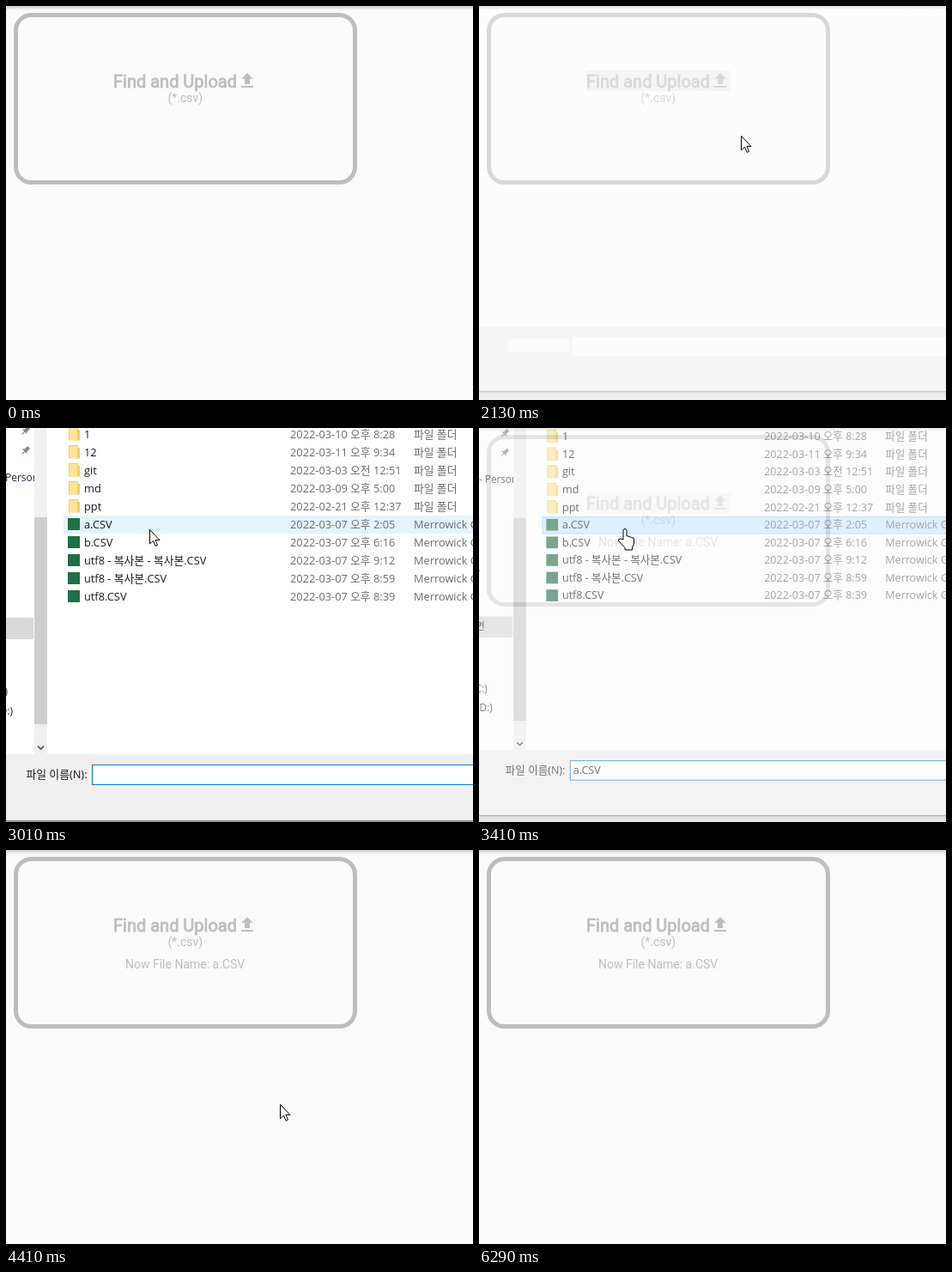
Animation of 544 by 459 pixels, one loop 6670 ms. Source, as an HTML page:

```html
<!DOCTYPE html>
<html lang="ko">
<head>
<meta charset="utf-8">
<title>CSV upload</title>
<style>
  html, body { margin: 0; width: 100%; height: 100%; overflow: hidden; background: #fafafa; }
  svg { display: block; }
  #page { font: 14px Roboto, sans-serif; fill: #bdbdbd; }
  #title { font-size: 20px; stroke: #bdbdbd; stroke-width: .8; }
  #dialog { font: 12.8px "Open Sans", "Noto Sans CJK KR", "Noto Sans CJK JP", sans-serif; fill: #1a1a1a; }
  .info { fill: #6d6d6d; }
  .nav { font-size: 12px; fill: #1e3246; }
  #cursor path { fill: #fff; stroke: #000; stroke-linejoin: round; }
</style>
</head>
<body>
<svg width="544" height="459" viewBox="0 0 544 459">
  <defs>
    <linearGradient id="shade" x2="0" y2="1">
      <stop stop-opacity=".19"/>
      <stop offset="1" stop-opacity="0"/>
    </linearGradient>
    <path id="pin" d="M-2-5h4v5l2 2H.6V6h-1.2V2H-4l2-2z" fill="#7b8b98"/>
  </defs>

  <g id="page">
    <rect width="544" height="459" fill="#fafafa"/>
    <rect width="544" height="5" fill="url(#shade)"/>
    <rect x="11.5" y="10.5" width="395" height="195" rx="18" fill="none" stroke="#bdbdbd" stroke-width="5"/>
    <rect id="focus" x="125" y="75" width="168" height="24" fill="#eee"/>
    <text id="title" x="125" y="95">Find and Upload</text>
    <path transform="translate(269 75)" d="M9 16h6v-6h4l-7-7-7 7h4zm-4 2h14v2H5z"/>
    <text x="188.5" y="112">(*.csv)</text>
    <text id="fileName" x="139" y="138">Now File Name: a.CSV</text>
  </g>

  <g id="dialog">
    <rect x="-40" y="458" width="640" height="16" fill="url(#shade)"/>
    <rect x="-40" y="-30" width="640" height="488" fill="#fff"/>
    <rect x="-40" y="380" width="640" height="77" fill="#f0f0f0"/>
    <rect x="-40" y="457" width="640" height="1.5" fill="#858585"/>
    <rect x="100.5" y="392.5" width="500" height="23" fill="#fff" id="input"/>
    <rect id="blankLabel" x="24" y="395" width="72" height="15" fill="#fff"/>
    <g id="content">
      <g class="nav">
        <use href="#pin" transform="translate(23 3) rotate(45)"/>
        <use href="#pin" transform="translate(23 26) rotate(45)"/>
        <rect x="-40" y="221" width="72" height="25" fill="#d9d9d9"/>
        <text x="-8" y="62">- Person</text>
        <g text-anchor="end">
          <text x="-6" y="167">.</text>
          <text x="-1" y="237">바탕 화면</text>
          <text x="2" y="311">(C:)</text>
          <text x="8" y="334">(D:)</text>
        </g>
      </g>
      <rect x="33" y="-30" width="15" height="410" fill="#f0f0f0"/>
      <rect x="33" y="104" width="15" height="241" fill="#cdcdcd"/>
      <path d="M37 370.5l3.5 3.5 3.5-3.5" fill="none" stroke="#505050" stroke-width="1.6"/>
      <rect id="rowMark" x="67.5" width="540" height="20"/>
      <g id="rows"></g>
      <text x="23.5" y="408" textLength="">파일 이름(N):</text>
      <text id="typed" x="104" y="408.5">a.CSV</text>
      <path id="caret" d="M104.5 397v15" stroke="#000"/>
    </g>
  </g>

  <g id="cursor">
    <path id="arrow" d="M.5.5V17l4-3.6 2.6 6 2.4-1-2.5-5.8h5z"/>
    <path id="hand" d="M3-.5q2 0 2 2V8q2-1 3 1 2-1 3 1 2.500-1 2.500 2v5l-2 4v3H3v-2.500l-7.500-8q-.5-2.500 2-2.500L1 12V1.500q0-2 2-2z"/>
  </g>
</svg>

<script>
const $ = id => document.getElementById(id);
const set = (el, attrs) => { for (const k in attrs) el.setAttribute(k, attrs[k]); };
const show = (id, on) => $(id).style.display = on ? '' : 'none';

const LOOP = 6670, TICK = 125;

const files = [
  ['1', '10 오후 8:28'], ['12', '11 오후 9:34'], ['git', '03 오전 12:51'],
  ['md', '09 오후 5:00'], ['ppt', '02-21 오전 12:37'],
  ['a.CSV', '07 오후 2:05'], ['b.CSV', '07 오후 6:16'],
  ['utf8 - 복사본 - 복사본.CSV', '07 오후 9:12'],
  ['utf8 - 복사본.CSV', '07 오후 8:59'], ['utf8.CSV', '07 오후 8:39']
];
const rowY = i => 7 + 21 * i;

$('rows').innerHTML = files.map(([name, when], i) => {
  const y = rowY(i), csv = name.endsWith('.CSV');
  const date = when.includes('-') ? `2022-${when.replace('02-21 오전', '02-21 오후')}` : `2022-03-${when}`;
  const icon = csv
    ? `<rect x="72" y="${y - 7}" width="14" height="14" fill="#1f7145"/>`
    : `<path d="M73 ${y - 8}h11v3h2v12.500h-13z" fill="#f3cd63"/><path d="M74 ${y - 7}h9v14h-9z" fill="#ffe496"/>`;
  return `${icon}<text x="91" y="${y + 4.5}">${name}</text>
    <g class="info"><text x="331" y="${y + 4.5}">${date}</text>
    <text x="475" y="${y + 4.5}">${csv ? 'Merrowick Grid' : '파일 폴더'}</text></g>`;
}).join('');

// Pointer moves: start time, number of ticks, from, to
const moves = [
  [490, 6, [613, 594], [211, 88]],
  [1620, 1, [211, 88], [223, 80]],
  [1760, 4, [223, 80], [308, 153]],
  [2630, 4, [308, 153], [167, 118]],
  [4410, 4, [167, 118], [463, 465]],
  [5040, 6, [630, 612], [199, 122]],
  [5790, 4, [199, 122], [322, 226]]
];

function pointerAt(t) {
  const move = moves.filter(m => m[0] <= t).pop();
  if (!move || t >= 6290) return null;
  const [start, ticks, from, to] = move;
  const k = Math.min(1, (Math.floor((t - start) / TICK) + 1) / ticks);
  const eased = 1 - (1 - k) ** 2.5;
  return from.map((v, i) => Math.round(v + (to[i] - v) * eased));
}

// Opacity and scale of the file dialog: from time, opacity, scale
const phases = [
  [0, 0, 1], [2130, .41, .972], [2255, .9, .994], [2380, 1, 1], [3410, .6, .98], [3550, 0, 1]
];

function draw(t) {
  const between = (a, b) => t >= a && t < b;
  const [, opacity, scale] = phases.filter(p => p[0] <= t).pop();
  const blank = t < 2255, chosen = t >= 3290;
  const pointer = pointerAt(t);

  show('focus', between(1760, 3550));
  show('fileName', chosen);
  show('dialog', opacity > 0);
  set($('dialog'), { opacity, transform: `translate(390 150) scale(${scale}) translate(-390 -150)` });
  show('content', !blank);
  show('blankLabel', blank);
  set($('input'), { stroke: blank ? 'none' : '#0078d7' });
  show('typed', chosen);
  show('caret', between(2255, 2880));

  show('cursor', pointer);
  if (!pointer) return;
  const hand = between(1115, 1760) || between(3410, 3550);
  show('hand', hand);
  show('arrow', !hand);
  set($('cursor'), { transform: `translate(${pointer})` });
  set($('rowMark'), {
    y: rowY(Math.round((pointer[1] - 7) / 21)) - 9.5,
    fill: chosen ? '#cce8ff' : '#e5f3ff',
    stroke: chosen ? '#99d1ff' : '#e5f3ff'
  });
}

function frame() {
  draw(performance.now() % LOOP);
  requestAnimationFrame(frame);
}
frame();
</script>
</body>
</html>
```
